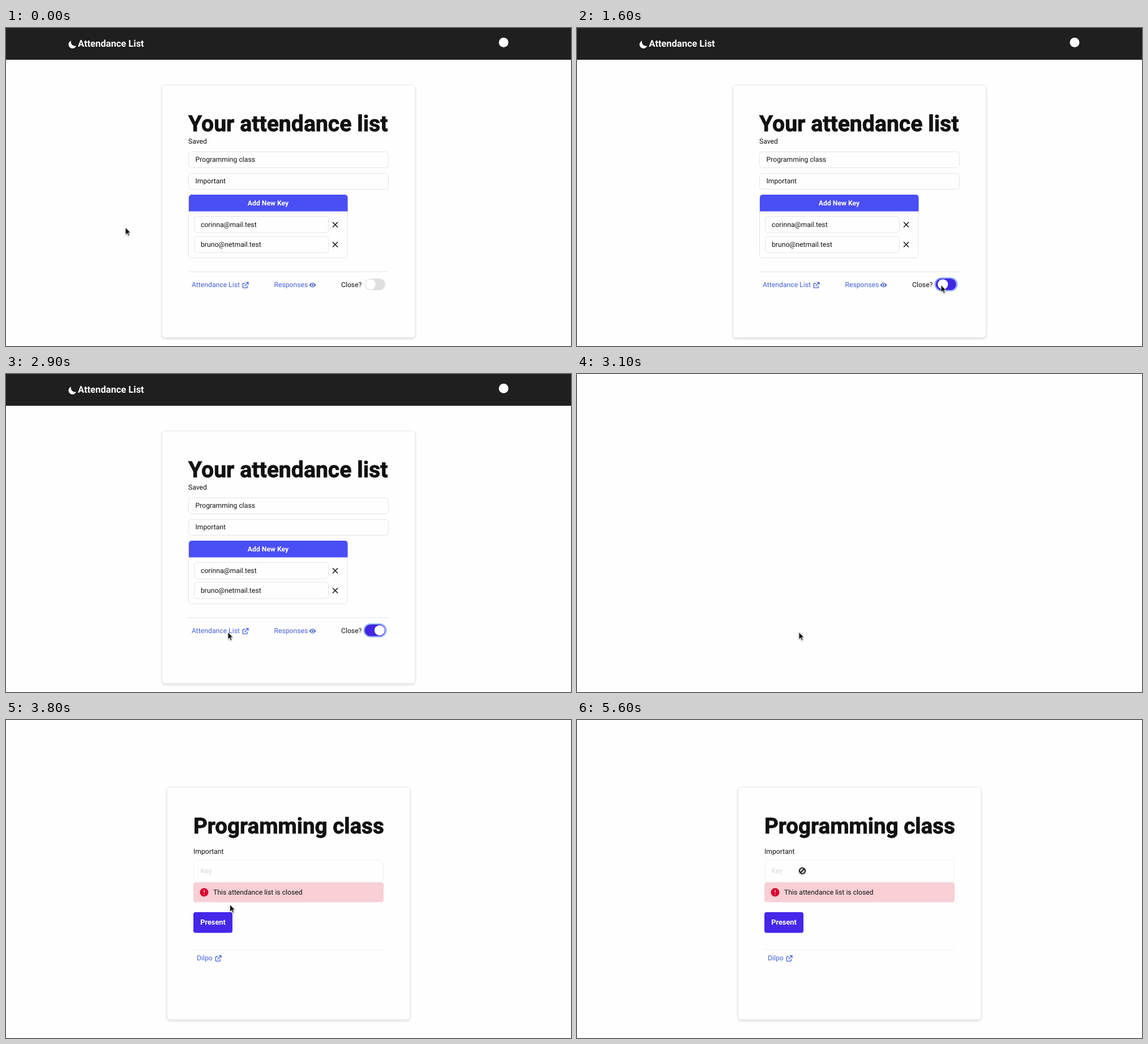
Write an HTML page that moves like this. It is 998 px wide and 561 px high and loops after 5700 ms.

```html
<!DOCTYPE html>
<html lang="en">
<head>
<meta charset="utf-8">
<title>Attendance list</title>
<style>
  html, body { margin: 0; width: 100%; height: 100%; overflow: hidden; background: #fefefe; }
  svg { display: block; width: 100vw; height: 100vh; }
  text { font: 12.2px Roboto, sans-serif; fill: #111113; text-rendering: geometricPrecision; }
  .bold { font-weight: 700; fill: #fff; }
  .brand { font-size: 16.5px; font-weight: 600; fill: #fff; }
  .heading { font-weight: 700; font-size: 39.2px; stroke: #111113; stroke-width: .8; }
  .link { fill: #4361d9; }
  .card { fill: #fefefe; stroke: #e9e9e9; filter: drop-shadow(0 2px 2px #0002); }
  .field { fill: none; stroke: #e4e4e4; }
  .icon { fill: none; stroke: #4361d9; stroke-width: 1.3; stroke-linecap: round; stroke-linejoin: round; }
  .cross { stroke: #111113; stroke-width: 1.5; }
  .pointer { filter: drop-shadow(.5px 1px 1px #0005); }
</style>
</head>
<body>
<svg viewBox="0 0 998 561">
  <defs>
    <g id="external" class="icon">
      <path d="M4 2.5H1.6Q.6 2.5.6 3.5V9.4Q.6 10.4 1.6 10.4H7.5Q8.5 10.4 8.5 9.4V7M6.5.7H10.2V4.4M10.2.7L4.2 6.7"/>
    </g>
    <path id="cross" class="cross" d="M-4.5-4.5L4.5 4.5M4.5-4.5L-4.5 4.5"/>
    <path id="sign" d="M-5 0A5 5 0 1 1 5 0A5 5 0 1 1-5 0M-3.5 3.5L3.5-3.5"/>
  </defs>

  <g id="editor">
    <rect width="998" height="56" fill="#1f1f1f"/>
    <path d="M115 22.5A7 7 0 1 0 124 31.5A7.2 7.2 0 0 1 115 22.5Z" fill="#fff"/>
    <text class="brand" x="127" y="33">Attendance List</text>
    <circle cx="879" cy="25.5" r="8.5" fill="#fff"/>

    <rect class="card" x="275.5" y="100.5" width="447" height="445.5" rx="5"/>
    <text class="heading" x="322" y="182">Your attendance list</text>
    <text x="322" y="204">Saved</text>
    <rect class="field" x="322.5" y="218.5" width="353" height="28" rx="5"/>
    <text x="334.5" y="236">Programming class</text>
    <rect class="field" x="322.5" y="256.5" width="353" height="28" rx="5"/>
    <text x="334.5" y="274">Important</text>

    <rect class="field" x="322.5" y="294.5" width="280.5" height="111" rx="5"/>
    <path d="M323 323.5V299.5Q323 294 328.5 294H598Q603.5 294 603.5 299.5V323.5Z" fill="#4a4ef5"/>
    <text class="bold" x="463" y="312.7" text-anchor="middle">Add New Key</text>
    <rect class="field" x="332.5" y="332.5" width="237" height="28.5" rx="5"/>
    <text x="344" y="351">corinna@mail.test</text>
    <use href="#cross" x="581.5" y="347"/>
    <rect class="field" x="332.5" y="367.5" width="237" height="28.5" rx="5"/>
    <text x="344" y="386">bruno@netmail.test</text>
    <use href="#cross" x="581.5" y="382"/>

    <path class="field" d="M322 430H676"/>
    <text class="link" x="328" y="457">Attendance List</text>
    <use href="#external" x="417.7" y="448"/>
    <text class="link" x="473.5" y="457">Responses</text>
    <path d="M535.5 453.5Q541.5 445.5 547.5 453.5Q541.5 461.5 535.5 453.5Z" fill="#4361d9"/>
    <circle cx="541.5" cy="453.5" r="2.2" fill="#4361d9" stroke="#fff" stroke-width="1.3"/>
    <text x="592" y="457">Close?</text>
    <rect id="ring" x="632.5" y="441" width="39" height="22.5" rx="11.2" fill="none" stroke="#8fb4f5" stroke-width="2"/>
    <rect id="track" x="633.5" y="442" width="36.5" height="20.5" rx="10.2"/>
    <circle id="knob" cy="452.2" r="9" fill="#fff"/>
  </g>

  <g id="response">
    <rect class="card" x="284.5" y="118.5" width="429" height="410" rx="5"/>
    <text class="heading" x="331" y="200" style="font-size:38.5px">Programming class</text>
    <text x="331" y="236">Important</text>
    <rect class="field" x="331.5" y="247.5" width="335" height="38" rx="4" style="stroke:#f0f0f0"/>
    <text x="343.5" y="269.5" style="fill:#d6d6d9">Key</text>
    <rect x="331" y="286.5" width="336" height="35" rx="4" fill="#f7cfd5"/>
    <circle cx="350" cy="304" r="7.5" fill="#d6022f"/>
    <path d="M350 299.7V304.5M350 307V308.4" stroke="#f7cfd5" stroke-width="1.4"/>
    <text x="366" y="308">This attendance list is closed</text>
    <rect x="331" y="339" width="69" height="36.5" rx="4" fill="#4527ea"/>
    <text class="bold" x="365.5" y="361.3" text-anchor="middle" style="font-size:12.8px">Present</text>
    <path class="field" d="M331 405H667" style="stroke:#ededed"/>
    <text class="link" x="337" y="424">Dilpo</text>
    <use href="#external" x="369.7" y="415"/>
  </g>

  <path id="arrow" class="pointer" d="M0 0V12.6L2.9 9.9 5 14.6 7.1 13.7 5.1 9.2H9Z"
        fill="#111" stroke="#fff" stroke-width=".8"/>
  <g id="blocked" class="pointer" fill="none">
    <use href="#sign" stroke="#fff" stroke-width="3.3"/>
    <use href="#sign" stroke="#161616" stroke-width="2.2"/>
  </g>
</svg>
<script>
  const LOOP = 5700, STEP = 100;
  const CLICK = 1550, PAGE_LEFT = 2950, PAGE_SHOWN = 3180;
  // Pointer moves: start time, end time, from, to
  const MOVES = [
    [330, 800, [211, 352], [522.5, 432.5]],
    [800, 1500, [522.5, 432.5], [643, 453.5]],
    [2080, 2800, [643, 453.5], [392, 455.5]],
    [3200, 3400, [392, 455.5], [390.5, 447]],
    [3400, 4050, [390.5, 447], [398, 266]],
  ];
  const $ = id => document.getElementById(id);
  const progress = (t, start, end) => Math.min(1, Math.max(0, (t - start) / (end - start)));
  const smooth = u => u * u * (3 - 2 * u);
  const easeOut = u => 1 - (1 - u) ** 3;
  const show = (id, visible) => $(id).style.display = visible ? "" : "none";
  const place = (id, x, y) => $(id).setAttribute("transform", `translate(${x} ${y})`);

  function pointerAt(t) {
    const [start, end, from, to] = MOVES.findLast(move => t >= move[0]) ?? MOVES[0];
    const u = smooth(progress(t, start, end));
    return from.map((v, i) => v + (to[i] - v) * u);
  }

  function draw(t) {
    show("editor", t < PAGE_LEFT);
    const on = smooth(progress(t, CLICK, CLICK + 200));
    $("knob").setAttribute("cx", 643.7 + 16.2 * on);
    $("track").setAttribute("fill", on > 0 ? "#4028e2" : "#dfdfe0");
    show("ring", on > 0);

    const shown = easeOut(progress(t, PAGE_SHOWN, PAGE_SHOWN + 450));
    show("response", shown > 0);
    $("response").setAttribute("opacity", shown);
    place("response", 0, 10 * (1 - shown));

    const [x, y] = pointerAt(t);
    const overLockedField = t > PAGE_SHOWN && y > 247 && y < 286;
    show("arrow", !overLockedField);
    show("blocked", overLockedField);
    place("arrow", x, y);
    place("blocked", x, y);
  }

  function frame() {
    const t = performance.now() % LOOP;
    draw(Math.floor(t / STEP) * STEP);
    requestAnimationFrame(frame);
  }
  frame();
</script>
</body>
</html>
```
